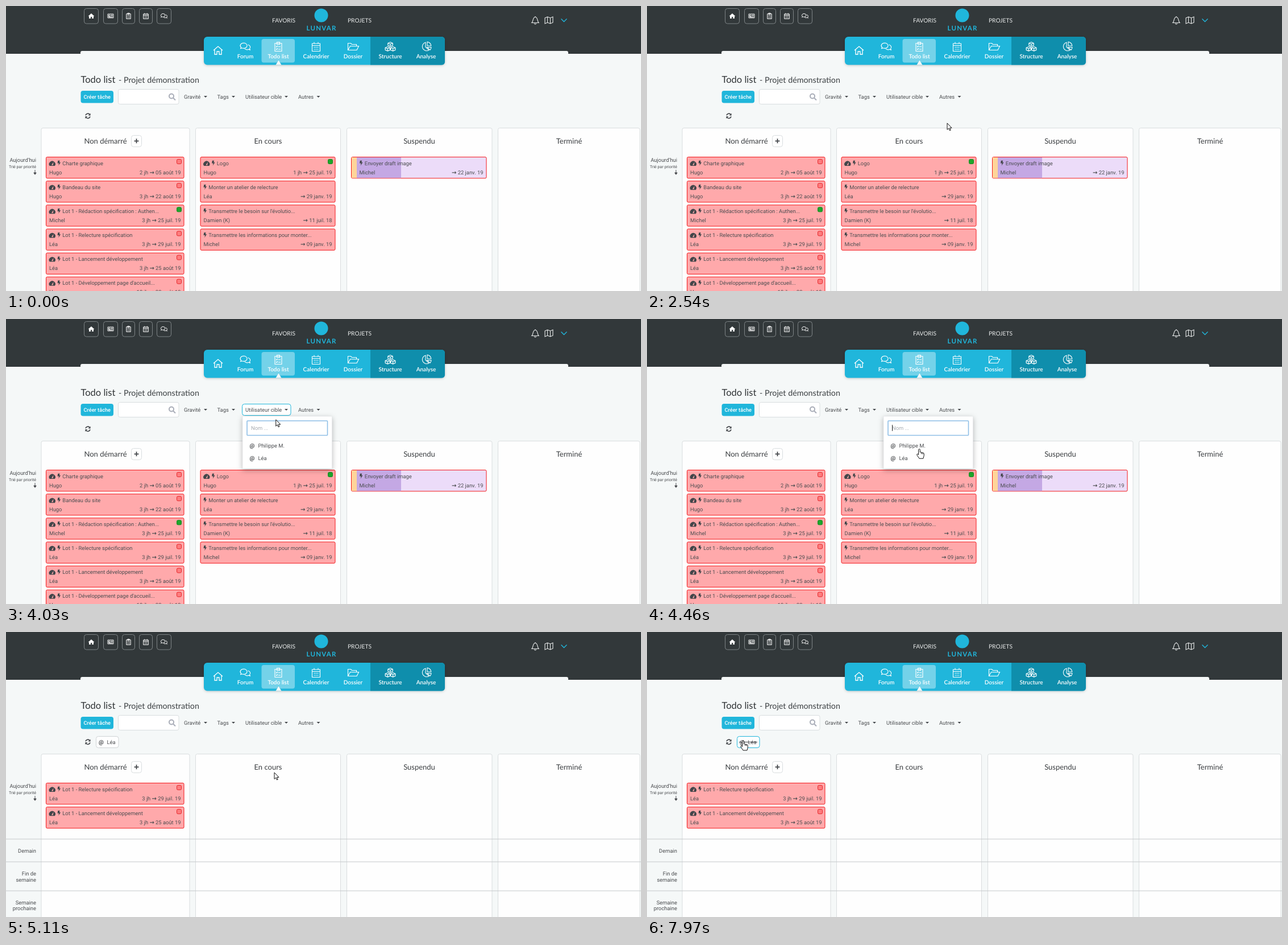
These frames come from a looping animation (1117 px wide and 501 px high, 8 s). An HTML page:

```html
<!DOCTYPE html>
<html lang="fr">
<head>
<meta charset="utf-8">
<title>Todo list</title>
<style>
html, body { margin: 0; width: 100%; height: 100%; overflow: hidden; background: #f5f8f8; }
svg { display: block; width: 100vw; height: 100vh; }
text { font: 9.4px Roboto, sans-serif; fill: #4b4d50; text-rendering: geometricPrecision; white-space: pre; }
.lato { font-family: Lato, sans-serif; }
.col { font: 13px Lato, sans-serif; fill: #3a3d40; text-anchor: middle; }
.nav { font: 600 10px Lato, sans-serif; fill: #fff; text-anchor: middle; }
.end { text-anchor: end; }
.arr { font: bold 10px "DejaVu Sans", sans-serif; }
</style>
</head>
<body>
<svg id="stage" viewBox="0 0 1117 501"></svg>
<script>
const CYAN = '#20b6db', INK = '#43464a', LINE = '#d9dddf', RED = '#f3191c';
const stage = document.getElementById('stage');

const cube = (x, y) => `M${x} ${y}l4.2 1.8v4l-4.2 1.8-4.2-1.8v-4zm-4.2 1.8l4.2 1.8 4.2-1.8m-4.2 1.8v4`;
const icons = {
  home: 'M-8 0L0-7 8 0M-6-1V7H-2V2H2V7H6V-1',
  house: 'M-5.5 .5L0-4.5 5.5 .5H4V4.5H1V1.5H-1V4.5H-4V.5z',
  chat: 'M-3-6.5a6 4.7 0 0 1 0 9.4q-1.5 0-3-.6l-2.8 1.3q1.3-1.4 1.4-2.3A6 4.7 0 0 1-3-6.5z' +
    'M4.5-3.5a5.5 4.5 0 0 1 3 7.2q.2 1 1.3 2.2l-3-1.2a6 5 0 0 1-7-1',
  clip: 'M-6-6H6V8H-6zM-2.5-6V-8H2.5V-4H-2.5V-6M-4-.5l1 1 2-2M0 0H4M-4 4l1 1 2-2M0 4.5H4',
  cal: 'M-7-5.5H7V8H-7zM-7-2H7M-3.5-8v3M3.5-8v3M-4 1h2M-1 1h2M2 1h2M-4 4.5h2M-1 4.5h2M2 4.5h2',
  news: 'M-8-5.5H8V5.5H-8zM-5.5-2.5h4v4h-4zM1-2.5H6M1 0H6M-5.5 3.5H6',
  folder: 'M-9 6V-6H-4L-2-4H6V-1M-9 6L-5-1H10L6.5 6z',
  cubes: cube(0, -8) + cube(-4.7, 0) + cube(4.7, 0),
  pie: 'M-1-7.5A7.5 7.5 0 1 0 5 6L-1 .5zM2-8.5A7.5 7.5 0 0 1 8.8-1.5H2zM2 1H9A7.5 7.5 0 0 1 7 5.8z',
  bell: 'M-6 4.5C-3 2-5-5.5 0-5.5S3 2 6 4.5zM-1.5 5.5a1.5 1.5 0 0 0 3 0M0-5.5V-7',
  map: 'M-7-4L-2.5-6 2.5-4 7-6V4L2.5 6-2.5 4-7 6zM-2.5-6V4M2.5-4V6',
  bolt: 'M-1.7-4.5h3.4l-1 3h2.4l-3.9 6 .9-4.2h-2.6z',
  gauge: 'M-4.6 4.2A5.6 5.4 0 1 1 4.6 4.2zM-1.2 2.6L2.3-2.6 1.2 3.2z',
  caret: 'M-3-1.4h6l-3 3z',
  plus: 'M-4 0H4M0-4V4',
  chevron: 'M-5-2.5L0 2.5 5-2.5'
};
const draw = (name, x, y, paint) => `<path d="${icons[name]}" transform="translate(${x} ${y})" ${paint}/>`;
const line = (name, x, y, color = '#fff', width = 1.1) =>
  draw(name, x, y, `fill="none" stroke="${color}" stroke-width="${width}"`);
const solid = (name, x, y, color = INK) => draw(name, x, y, `fill="${color}" fill-rule="evenodd"`);
const small = (name, x, y) =>
  `<g transform="translate(${x} ${y}) scale(.62)">${line(name, 0, 0, '#fff', 1.6)}</g>`;
const rect = (x, y, w, h, fill, extra = '') =>
  `<rect x="${x}" y="${y}" width="${w}" height="${h}" fill="${fill}" ${extra}/>`;
const box = (x, y, w, h, fill, stroke, r = 4, extra = '') =>
  rect(x, y, w, h, fill, `stroke="${stroke}" rx="${r}" ${extra}`);
const text = (x, y, s, cls = '', style = '') => `<text x="${x}" y="${y}" class="${cls}" style="${style}">${s}</text>`;
const group = (id, body) => `<g id="${id}">${body}</g>`;
const at = (x, y) => text(x, y, '@', '', 'font-weight:700;font-size:10px');

function card(x, w, y, [title, who, days, date, dot], purple) {
  const inner = purple ? x + 14 : x + 5.5;
  const bolt = x + (purple ? 17 : dot ? 22.5 : 8);
  let s = box(x, y, w, 37.3, purple ? '#ecdcf9' : '#ffa9ab', RED, 2);
  if (purple) s += rect(x + .5, y + .5, 9, 36.3, '#ffd59a') + rect(x + 9.5, y + .5, 78, 36.3, '#c4a8e4');
  if (dot) s += solid('gauge', x + 10.8, y + 11.3) +
    box(x + w - 12.5, y + 4, 8, 8, dot == 'r' ? '#ff7c7e' : '#1ea62c', dot == 'r' ? '#e3282b' : '#148a20', 2);
  return s + solid('bolt', bolt, y + 10.8) + text(bolt + 6.3, y + 14, title) +
    text(inner, y + 30, who) +
    text(x + w - 5.5, y + 30, `${days && days + ' jh '}<tspan class="arr">→</tspan> ${date}`, 'end');
}
const cards = (x, w, list, purple) => list.map((c, i) => card(x, w, 265.5 + i * 42.15, c, purple)).join('');

const review = ['Lot 1 - Relecture spécification', 'Léa', 3, '29 juil. 19', 'r'];
const launch = ['Lot 1 - Lancement développement', 'Léa', 3, '25 août 19', 'r'];
const waiting = [
  ['Charte graphique', 'Hugo', 2, '05 août 19', 'r'],
  ['Bandeau du site', 'Hugo', 3, '22 août 19', 'r'],
  ['Lot 1 - Rédaction spécification : Authen...', 'Michel', 3, '25 juil. 19', 'g'],
  review, launch,
  ["Lot 1 - Développement page d'accueil...", 'Hugo', 10, '30 août 19', 'r']
];
const running = [
  ['Logo', 'Hugo', 1, '25 juil. 19', 'g'],
  ['Monter un atelier de relecture', 'Léa', '', '29 janv. 19'],
  ["Transmettre le besoin sur l'évolutio...", 'Damien (K)', '', '11 juil. 18'],
  ['Transmettre les informations pour monter...', 'Michel', '', '09 janv. 19']
];
const paused = [['Envoyer draft image', 'Michel', '', '22 janv. 19']];

const header = () => {
  const buttons = [[137.5, 25, 'house'], [171.5, 25, 'news'], [204.5, 22, 'clip'], [234.5, 23, 'cal'], [265.5, 25, 'chat']];
  const tabs = [[421, 'chat', 'Forum'], [479, 'clip', 'Todo list'], [545.5, 'cal', 'Calendrier'],
    [610.5, 'folder', 'Dossier'], [676, 'cubes', 'Structure'], [739, 'pie', 'Analyse']];
  return rect(0, 0, 1117, 84, '#32383a') +
    '<path d="M131 85V82q0-3 3-3H986q3 0 3 3V85z" fill="#f5f8f8"/>' +
    buttons.map(([x, w, name]) => box(x, 4.5, w, 26.5, 'none', '#7d8385') +
      (name == 'house' ? solid(name, x + w / 2, 17.5, '#fff') : small(name, x + w / 2, 17.5))).join('') +
    text(468, 28.5, 'FAVORIS', 'lato', 'font-size:10.2px;fill:#e8eaea') +
    text(601, 28.5, 'PROJETS', 'lato', 'font-size:10.2px;fill:#e8eaea') +
    `<circle cx="554.5" cy="16.5" r="12" fill="${CYAN}"/>` +
    text(555, 43, 'LUNVAR', 'lato', `font-size:11.5px;font-weight:700;letter-spacing:1.2px;text-anchor:middle;fill:${CYAN}`) +
    line('bell', 931, 25, '#e8eaea') + line('map', 955, 25, '#e8eaea') + line('chevron', 981.5, 25, CYAN, 1.4) +
    rect(348, 54, 424, 49.5, CYAN, 'rx="6" style="filter:drop-shadow(0 1px 2px #0003)"') +
    '<path d="M641 54H766q6 0 6 6V97.5q0 6-6 6H641z" fill="#0f8eac"/>' +
    rect(449.5, 58, 58.5, 41.5, '#74d2e9', 'rx="4"') +
    '<path d="M474.5 103.5L479.5 95.5 484.5 103.5z" fill="#f5f8f8"/>' +
    line('home', 373, 78, '#fff', 1.3) +
    tabs.map(([x, name, label]) => line(name, x, 71.5) + text(x, 92, label, 'nav')).join('');
};

const filters = () =>
  text(131.5, 135, 'Todo list', 'lato', 'font-size:16.5px;fill:#2f3335') +
  text(198, 135, '- Projet démonstration', 'lato', 'font-size:14.3px;fill:#3c4043') +
  rect(131.5, 149, 57.5, 21.5, CYAN, 'rx="4"') +
  text(160.3, 162.5, 'Créer tâche', '', 'fill:#fff;font-weight:500;font-size:9.2px;text-anchor:middle') +
  box(197.5, 146.5, 106.5, 26, '#fff', LINE, 3) +
  '<g fill="none" stroke="#a9adb8" stroke-width="2"><circle cx="291" cy="158.5" r="4"/><path d="M294 161.5l4 4"/></g>' +
  box(415.5, 149.5, 85.5, 20, '#fff', CYAN, 4, 'id="target"') +
  [[313, 'Gravité', 351], [371.5, 'Tags', 400], [421, 'Utilisateur cible', 493], [514, 'Autres', 549.5]]
    .map(([x, label, c]) => text(x, 162.5, label) + solid('caret', c, 159.5)).join('') +
  `<g transform="translate(144 193.3)" fill="${INK}"><path d="M-4-1A4.2 4.2 0 0 1 3-3M4 1A4.2 4.2 0 0 1-3 3" fill="none" stroke="${INK}" stroke-width="1.6"/>` +
  '<path d="M4.6-4.8V-.8H.6zM-4.6 4.8V.8H-.6z"/></g>' +
  group('chip', box(158.5, 183.5, 39.5, 20, '#fff', '#cfd3d5', 4, 'id="chipBox"') +
    at(163, 197) + text(177.5, 197, 'Léa') + rect(162, 193, 32, 1, INK, 'id="strike"'));

const board = () =>
  [[62, 261, 'Non démarré', 175], [333.5, 255, 'En cours', 461], [599.5, 255.5, 'Suspendu', 727], [865.5, 249.5, 'Terminé', 990.5]]
    .map(([x, w, label, c]) => box(x, 214.5, w, 300, '#fefefe', LINE, 3) + text(c, 241.7, label, 'col')).join('') +
  box(220.5, 227.5, 18, 20, '#fff', LINE, 4, 'id="plusBox"') + line('plus', 229.5, 237.3, INK, 1.8) +
  text(53, 273.5, "Aujourd'hui", 'end') + text(53, 284.5, 'Trié par priorité', 'end', 'font-size:7.1px') +
  `<path d="M51 288v6M48.8 293L51 296.3 53.2 293z" fill="${INK}" stroke="${INK}" stroke-width=".9"/>` +
  group('all', cards(70.5, 242.5, waiting) + cards(342, 237, running) + cards(607.5, 237.5, paused, true)) +
  group('filtered', cards(70.5, 242.5, [review, launch]) +
    [364, 404, 455].map(y => rect(0, y - .5, 1117, 1, '#c6cacb')).join('') +
    [[387.5, 'Demain'], [427.5, 'Fin de'], [438.5, 'semaine'], [478.5, 'Semaine'], [489, 'prochaine']]
      .map(([y, s]) => text(53, y, s, 'end')).join(''));

const menu = () => group('menu',
  rect(416, 171, 157.5, 92, '#fff', 'stroke="#dfe2e4" stroke-width=".6" style="filter:drop-shadow(0 3px 5px #0004)"') +
  box(424, 179, 141.5, 25.5, '#fff', '#8fbfe6', 1, 'stroke-width="1.6"') +
  text(431, 195, 'Nom ...', '', 'fill:#a6abb1') + rect(431, 186, 1, 11, '#333', 'id="caret"') +
  at(428.5, 226.3) + text(443.5, 226, 'Philippe M.') + at(428.5, 247.8) + text(443.5, 247.5, 'Léa'));

const pointer = () =>
  '<circle id="click" r="8" fill="#f6ec2c" opacity=".8"/>' +
  '<g id="cursor" fill="#fff" stroke="#111" stroke-linejoin="round">' +
  '<path id="arrow" d="M0 0V11.5L2.6 9 4.4 13 6.2 12.2 4.5 8.4H8z"/>' +
  '<path id="hand" d="M-1.3 1.2Q0-1 1.4 1.2V6Q2.6 5 3.7 6.4 5 5.6 6 7 8 6.6 8.3 8.6V12L7 17H0L-4.2 10.6Q-4 8.4-2.8 9L-1.3 10.5zM3.7 6.4V9M6 7V9.4"/></g>';

stage.innerHTML = header() + filters() + board() + menu() + pointer();
const el = id => document.getElementById(id);
const show = (id, on) => el(id).style.display = on ? '' : 'none';

// Each move: start, end, then a quadratic curve.
const moves = [
  [1270, 2010, 911, 495, 617, 420, 582, 281],
  [2110, 2910, 582, 281, 540, 200, 468, 161],
  [3300, 3620, 468, 161, 470, 164, 471, 168],
  [3960, 4610, 471, 168, 490, 209, 473, 245],
  [5100, 5110, 473, 245, 472, 246, 472, 247],
  [7000, 7790, 472, 247, 340, 341, 214, 222],
  [7800, 7970, 214, 222, 192, 204, 169, 191]
];
const clamp = v => Math.min(1, Math.max(0, v));
function position(t) {
  const [a, b, x0, y0, cx, cy, x1, y1] = moves.filter(m => t >= m[0]).pop() || moves[0];
  const s = clamp((t - a) / (b - a)), r = 1 - s;
  const curve = (p, c, q) => r * r * p + 2 * r * s * c + s * s * q;
  return [curve(x0, cx, x1), curve(y0, cy, y1)];
}

function render(t) {
  const within = (a, b) => t >= a && t < b;
  const [x, y] = position(t);
  const overPlus = within(7700, 7780), overChip = t >= 7900;
  const hand = within(2840, 4000) || within(4400, 5100) || overPlus || overChip;
  show('cursor', t >= 1270);
  show('arrow', !hand);
  show('hand', hand);
  el('cursor').setAttribute('transform', `translate(${x} ${y})`);
  show('click', within(3100, 3280) || within(4830, 4900));
  el('click').setAttribute('transform', `translate(${x} ${y})`);
  show('target', within(2840, 4100));
  el('target').style.opacity = clamp((t - 2840) / 150);
  show('menu', within(3280, 4920));
  el('menu').style.opacity = clamp((t - 3280) / 150);
  show('caret', within(3280, 3790) || within(4300, 4830));
  show('chip', t >= 4920);
  show('strike', overChip);
  el('chipBox').setAttribute('stroke', overChip ? CYAN : '#cfd3d5');
  el('plusBox').setAttribute('stroke', overPlus ? CYAN : LINE);
  show('all', t < 5110);
  show('filtered', t >= 5110);
}

const start = performance.now();
(function tick() {
  render((performance.now() - start) % 8000);
  requestAnimationFrame(tick);
})();
</script>
</body>
</html>
```
